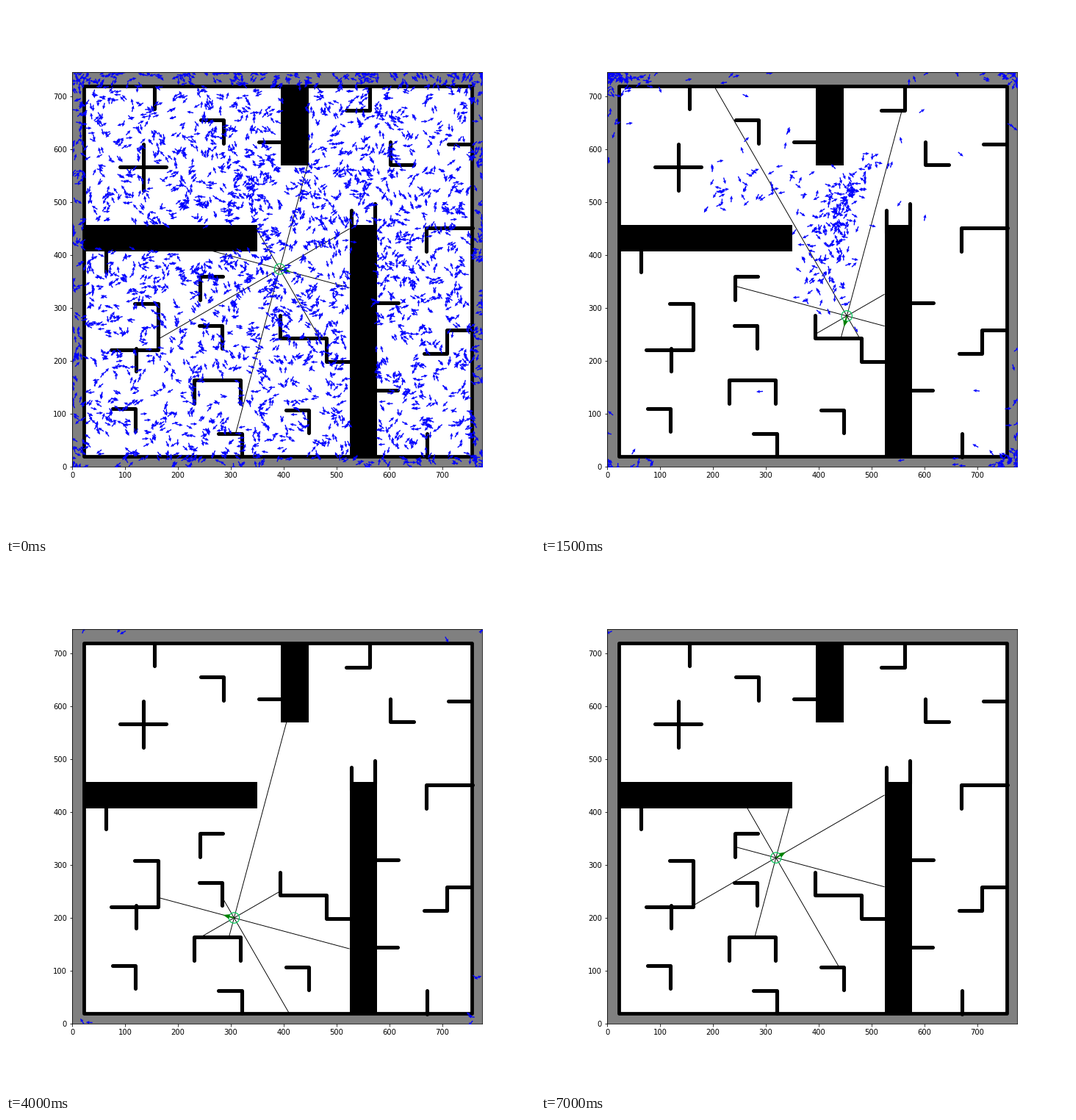
A matplotlib script that plays this animation: 720 px wide and 720 px high, repeating every 7100 ms.

```python
import numpy as np
import matplotlib.pyplot as plt
from matplotlib.animation import ArtistAnimation
from matplotlib.collections import LineCollection
from matplotlib.patches import Circle, Rectangle

SIZE, FRAMES, INTERVAL = 720, 71, 100
LEFT, TOP, RIGHT, BOTTOM = 90, 90, 648, 627
GREY, BLUE, RING, ARROW = "#808080", "#0000ff", "#10c860", "#008000"

ROOM = (105, 108, 633, 612.7)
BLOCKS = [(373, 108, 411, 216), (105, 297, 341, 333), (467, 297, 504, 612)]

# Thin walls: a start point and one-arm moves (up, down, left, right)
ARM = 31.7
MOVES = {"U": (0, -ARM), "D": (0, ARM), "L": (-ARM, 0), "R": (ARM, 0)}
WALLS = [
    (201, 108, "D"), (264, 154.5, "RD"), (186, 187, "DD"), (154, 218.5, "RR"),
    (343, 184.5, "R"), (494, 110, "DL"), (522.5, 184, "DR"), (601, 187, "R"),
    (469.5, 277, "D"), (501.5, 268, "D"), (571, 333, "URR"), (501.5, 403, "R"),
    (568, 472.5, "RUR"), (500.5, 522, "R"), (572, 613.5, "U"),
    (372, 420, "DRRDR"), (380, 549, "RD"), (135, 330, "D"),
    (174.5, 404, "RDDLL"), (176, 465, "D"), (263, 399, "UR"),
    (262, 434, "RD"), (255, 540.3, "URRD"), (144, 547, "RD"), (288.5, 581, "RD"),
]

# Robot: heading, frames and pixels per frame of each leg; a turn takes a frame
START = (372, 357.5)
LEGS = [(345, 7, 8.4), (255, 19, 7.2), (165, 25, 7.2), (30, 16, 7.2)]
STEP = 7.2

HUB = np.array((405, 262))
TIPS = np.array([(230, 235), (475, 195), (380, 395)])

rng = np.random.default_rng(7)


def direction(angle):
    """Unit vectors on the stage, where y points down."""
    return np.stack([np.cos(angle), -np.sin(angle)], axis=-1)


def robot_path():
    """Position and heading for every frame."""
    pos, poses = np.array(START), []
    for heading, count, speed in LEGS:
        poses.append((pos, heading))
        for _ in range(count):
            pos = pos + speed * direction(np.radians(heading))
            poses.append((pos, heading))
    return poses


def wall_points(x, y, moves):
    steps = [(x, y)] + [MOVES[m] for m in moves]
    return np.cumsum(steps, axis=0)


def box_edges(x0, y0, x1, y1):
    return np.array([(x0, y0), (x1, y0), (x1, y1), (x0, y1), (x0, y0)], float)


POSES = robot_path()
PATHS = [wall_points(*w) for w in WALLS]
OUTLINES = PATHS + [box_edges(*b) for b in BLOCKS + [ROOM]]
SEG_A = np.concatenate([line[:-1] for line in OUTLINES])
SEG_D = np.concatenate([np.diff(line, axis=0) for line in OUTLINES])


def cross(a, b):
    return a[..., 0] * b[..., 1] - a[..., 1] * b[..., 0]


def cast(origin, angle):
    """Point where a beam first meets a wall."""
    ray = direction(np.radians(angle))
    det = cross(ray, SEG_D)
    gap = SEG_A - origin
    dist = cross(gap, SEG_D) / det
    along = cross(gap, ray) / det
    hit = (dist > 0) & (along >= 0) & (along <= 1)
    return origin + ray * dist[hit].min()


def is_free(p):
    ok = np.ones(len(p), bool)
    for x0, y0, x1, y1 in BLOCKS:
        ok &= ~((p[:, 0] > x0) & (p[:, 0] < x1) & (p[:, 1] > y0) & (p[:, 1] < y1))
    return ok


def bound(p):
    return np.clip(p, (LEFT + 1, TOP + 1), (RIGHT - 1, BOTTOM - 1))


def scatter_uniform(n):
    return rng.uniform((LEFT, TOP), (RIGHT, BOTTOM), (n, 2))


def scatter_cloud(n, t):
    """Three fuzzy arms that meet between the thick walls."""
    tip = TIPS[rng.choice(3, n, p=[.25, .23, .52])]
    reach = rng.random((n, 1)) ** 1.2
    sigma = np.interp(t, [0, 3, 7, 15], [110, 48, 21, 14])
    return HUB + (tip - HUB) * reach + rng.normal(0, sigma, (n, 2))


def scatter_border(n, t):
    """Along the grey margin, mostly near the top left and bottom right."""
    first = np.interp(t, [7, 49, 70], [.5, .55, 1])
    corner = rng.choice(4, n, p=np.array([0, .33, .17, .5]) * (1 - first)
                        + np.array([first, 0, 0, 0]))
    reach = np.interp(t, [0, 7, 15], [250, 130, 30])
    p = np.stack([rng.exponential(reach, n), rng.uniform(0, 15, n)], axis=1)
    swap = rng.random(n) < .4
    p[swap] = p[swap, ::-1]
    x = np.where(corner % 2, RIGHT - p[:, 0], LEFT + p[:, 0])
    y = np.where(corner > 1, BOTTOM - p[:, 1], TOP + p[:, 1])
    return np.stack([x, y], axis=1)


def fresh(n, t):
    """New particles, in close pairs, from the mixture that holds at frame t."""
    stray = np.interp(t, [0, 3, 7, 23], [.78, .4, .04, 0])
    edge = np.interp(t, [0, 7, 15, 32, 45], [.04, .2, .42, .65, 1])
    m = 2 * n + 10
    n_stray, n_edge = int(m * stray), int(m * edge)
    p = np.concatenate([scatter_uniform(n_stray), scatter_border(n_edge, t),
                        scatter_cloud(m - n_stray - n_edge, t)])
    p = np.repeat(rng.permutation(p[is_free(p)]), 2, axis=0)
    heading = np.repeat(rng.uniform(0, 2 * np.pi, len(p) // 2), 2)
    p = p + rng.normal(0, 3, p.shape)
    return p[:n], heading[:n] + rng.normal(0, .4, n)


def particle_count(t):
    fall = np.interp(t, [0, 7, 15, 23, 32, 49, 70],
                     np.log([3300, 1800, 430, 140, 22, 7, 1]))
    return int(round(np.exp(fall)))


def particle_run():
    """Each frame moves some particles like the robot and redraws the rest."""
    pos, head = fresh(particle_count(0), 0)
    sets = [(bound(pos), head)]
    for t in range(1, FRAMES):
        n = particle_count(t)
        turn = np.radians(POSES[t][1] - POSES[t - 1][1])
        head = head + turn
        if turn == 0:
            pos = pos + STEP * direction(head)
        keep = is_free(pos) & (rng.random(len(pos)) < .5)
        pos, head = pos[keep][:n // 2], head[keep][:n // 2]
        new_pos, new_head = fresh(n - len(pos), t)
        pos = bound(np.concatenate([pos, new_pos]))
        head = np.concatenate([head, new_head])
        sets.append((pos, head))
    return sets


fig = plt.figure(figsize=(SIZE / 72, SIZE / 72), dpi=72, facecolor="white")
chart = fig.add_axes([LEFT / SIZE, 1 - BOTTOM / SIZE,
                      (RIGHT - LEFT) / SIZE, (BOTTOM - TOP) / SIZE])
chart.set(facecolor=GREY, xlim=(0, 775), ylim=(0, 745.8),
          xticks=range(0, 701, 100), yticks=range(0, 701, 100))

# Whole coordinates fall on pixel centres
stage = fig.add_axes([0, 0, 1, 1])
stage.set(xlim=(-.5, SIZE - .5), ylim=(SIZE - .5, -.5))
stage.axis("off")


def add_box(x0, y0, x1, y1, **style):
    return stage.add_patch(Rectangle((x0, y0), x1 - x0, y1 - y0, **style))


frame_box = add_box(LEFT, TOP, RIGHT, BOTTOM, fc="none", ec="none")
add_box(*ROOM, fc="white", ec="none", zorder=0)
add_box(*ROOM, fc="none", ec="black", lw=4.8, joinstyle="round", zorder=2)
for block in BLOCKS:
    add_box(*block, fc="black", ec="none", zorder=2)
for path in PATHS:
    stage.plot(path[:, 0], path[:, 1], color="black", lw=5.1, zorder=2,
               solid_capstyle="round", solid_joinstyle="round")


def arrows(pos, angle, length, color, **style):
    q = stage.quiver(pos[:, 0], pos[:, 1],
                     length * np.cos(angle), length * np.sin(angle),
                     color=color, units="xy", scale_units="xy", scale=1, **style)
    q.set_clip_path(frame_box)
    return q


def draw_frame(pose, particles):
    center, heading = pose
    beams = LineCollection([[center, cast(center, a)] for a in range(30, 390, 45)],
                           colors="black", linewidths=.95, zorder=1)
    stage.add_collection(beams, autolim=False)
    ring = stage.add_patch(Circle(center, 7.2, fc="none", ec=RING, lw=1.3, zorder=1.4))
    pointer = arrows(center[None], np.radians([heading]), 15.5, ARROW,
                     width=1.9, headwidth=3.4, headlength=4.6, zorder=1.5)
    cloud = arrows(*particles, 9, BLUE, pivot="mid", width=1.35, headwidth=3.2,
                   headlength=3.6, headaxislength=3.2, zorder=3)
    return [beams, ring, pointer, cloud]


artists = [draw_frame(*scene) for scene in zip(POSES, particle_run())]
anim = ArtistAnimation(fig, artists, interval=INTERVAL, repeat=True, repeat_delay=0)
plt.show()
```
